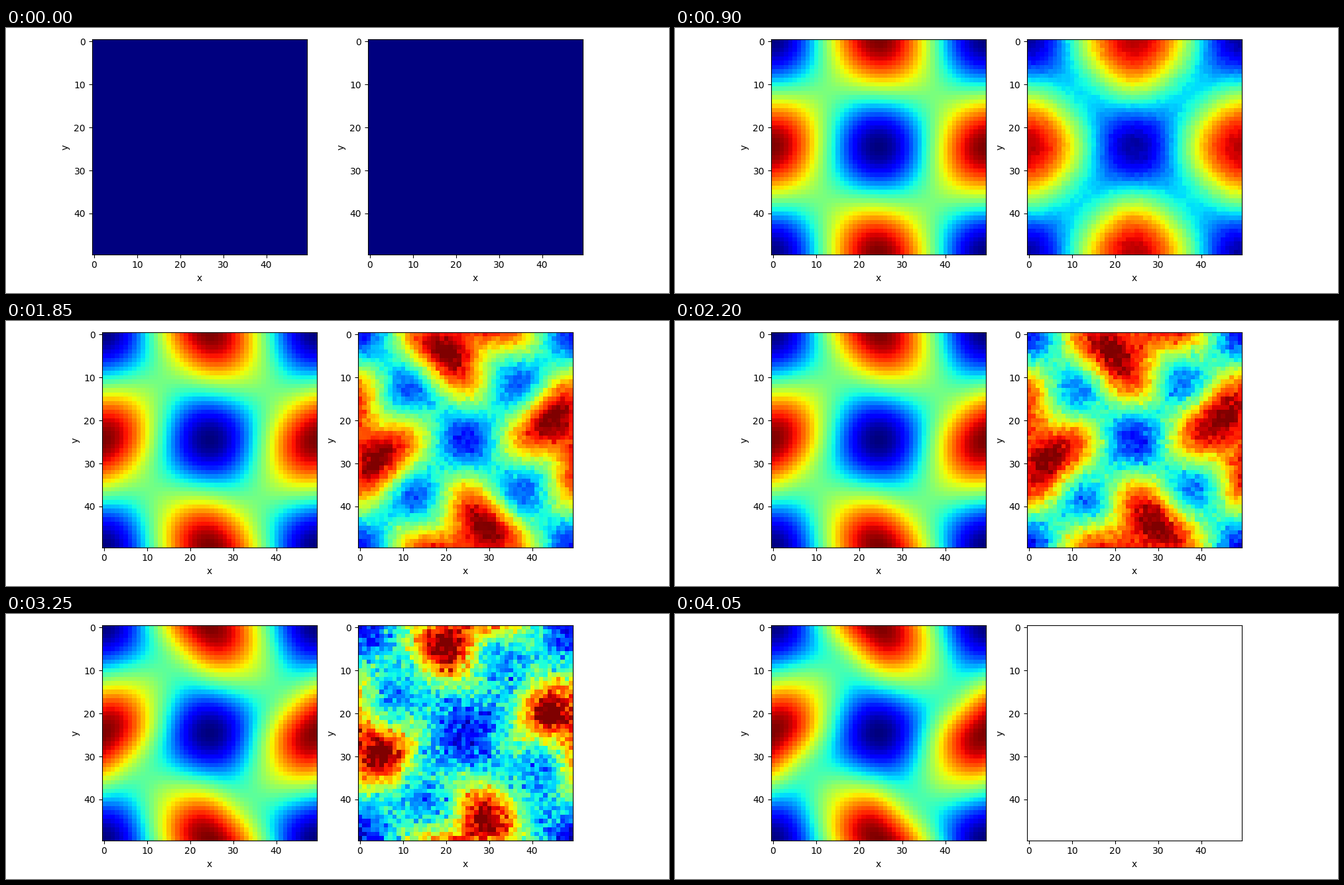
Animation of 1000 by 400 pixels, one loop 4100 ms. Source, as a matplotlib script:

```python
import numpy as np
import matplotlib.pyplot as plt
from matplotlib.animation import FuncAnimation

N = 50
STEP = 50           # ms per frame
FRAMES = 82
BLOWUP = 3950       # ms at which the right run diverges
SIZE = 324.5        # axes side in pixels
BOTTOM = 341.65     # pixels from the top of the stage

y, x = 2 * np.pi * (np.mgrid[:N, :N] + 0.5) / N

# Modes that share the fourfold symmetry of the vortex lattice.
cells = -np.cos(x) * np.cos(y)
shear = (np.cos(x) - np.cos(y)) * np.sin(x) * np.sin(y)
wave = (np.cos(2 * x) + np.cos(2 * y)) / 2
fine = np.cos(2 * x) * np.cos(2 * y)
swirl = shear * cells

# Strength of each mode in the right run at a few moments.
TIMES = [0, 400, 900, 1500, 2200, 2650, 3250, 3900]
MEAN = [0.50, 0.50, 0.47, 0.53, 0.59, 0.53, 0.49, 0.51]
CELLS = [0.50, 0.50, 0.46, 0.37, 0.36, 0.23, 0.36, 0.30]
WAVE = [0, 0, 0.07, 0.17, 0.11, 0.25, 0.06, 0.15]
FINE = [0, 0, -0.05, -0.19, -0.21, -0.19, -0.07, -0.13]
SHEAR = [0, 0, 0, -0.05, -0.18, -0.27, -0.22, -0.24]
SWIRL = [0, 0, 0, -0.49, -0.20, -0.48, -0.55, -0.50]
MODES = [(MEAN, 1), (CELLS, cells), (WAVE, wave),
         (FINE, fine), (SHEAR, shear), (SWIRL, swirl)]


def stable(t):
    """Slowly sheared lattice, scaled to its own range."""
    skew = 0.3 * (t / 4050) ** 1.2
    p = cells + skew * (shear - 0.5 * shear**2)
    return (p - p.min()) / (p.max() - p.min())


def unstable(t, n):
    """Sloshing lattice with growing grain, lost at the blow-up."""
    if t >= BLOWUP:
        return np.full((N, N), np.nan)
    p = sum(np.interp(t, TIMES, level) * mode for level, mode in MODES)
    grain = 0.06 * (t / 3250) ** 1.7
    noise = np.random.default_rng(n).normal(size=(N, N))
    return np.clip(p + grain * noise, 0, 1)


fig = plt.figure(figsize=(10, 4), dpi=100, facecolor="white")
cmap = plt.get_cmap("jet").copy()
cmap.set_bad("white")
axes = [fig.add_axes([0, 0, 1, 1], label=name) for name in ("left", "right")]
images = []
for ax in axes:
    images.append(ax.imshow(np.zeros((N, N)), cmap=cmap, vmin=0, vmax=1,
                            aspect="auto", interpolation="nearest"))
    ax.set_xlabel("x")
    ax.set_ylabel("y")


def show(lefts, fields):
    for ax, im, left, field in zip(axes, images, lefts, fields):
        ax.set_position([left / 1000, 1 - BOTTOM / 400,
                         SIZE / 1000, SIZE / 400])
        im.set_data(field)


def update(n):
    t = n * STEP
    if n == 0:
        show((129.7, 545.7), np.zeros((2, N, N)))
    else:
        show((144.7, 530.7), (stable(t), unstable(t, n)))
    return images


def reset():
    return update(0)


anim = FuncAnimation(fig, update, frames=FRAMES, init_func=reset,
                     interval=STEP, repeat=True, repeat_delay=0, blit=False)
plt.show()
```
